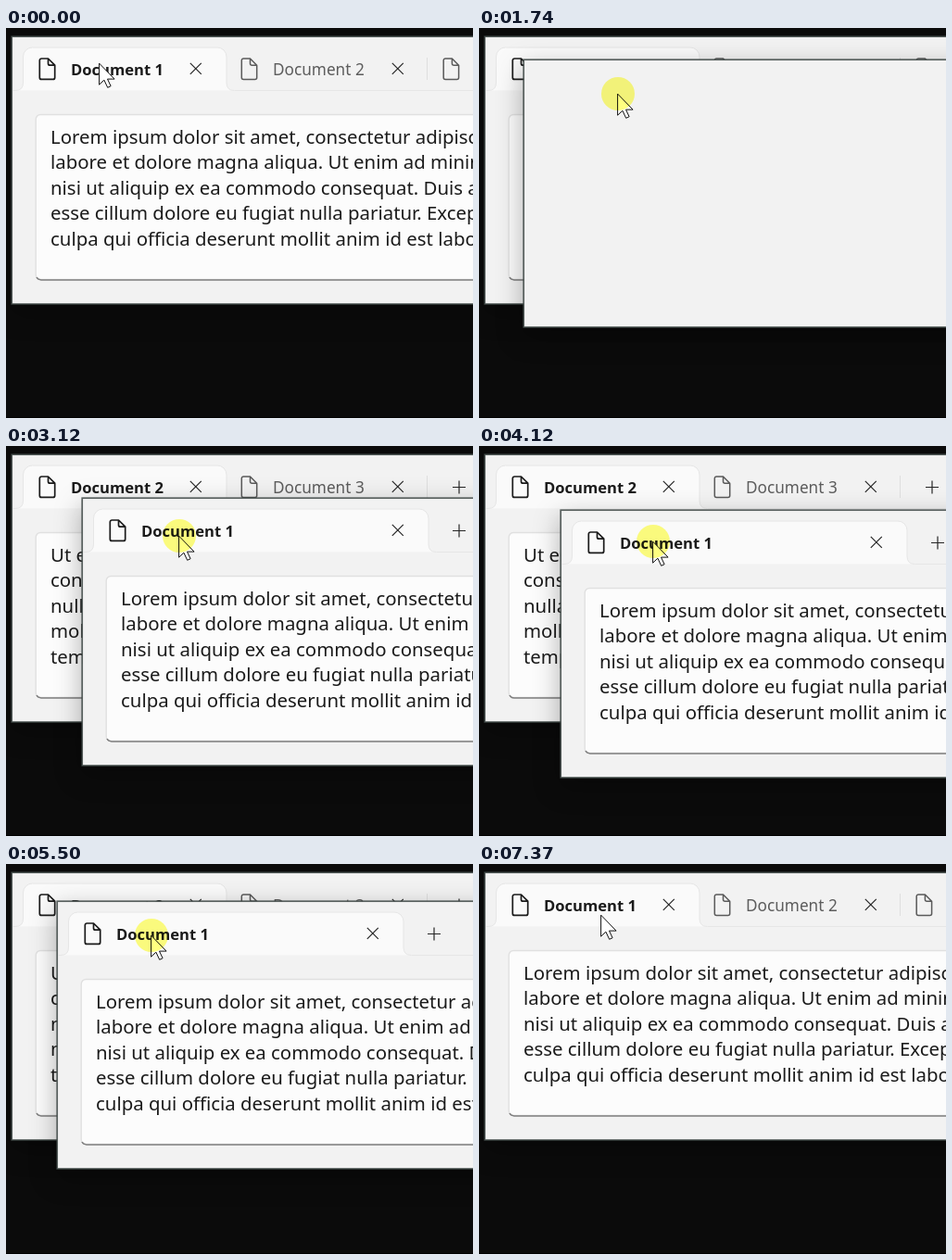
Recreate the animation shown at these times as an HTML page. Size 504 px wide and 421 px high, loop 7880 ms.

```html
<!DOCTYPE html>
<html lang="en">
<head>
<meta charset="utf-8">
<title>Tab tear-off</title>
<style>
  html, body { margin: 0; width: 100%; height: 100%; overflow: hidden; background: #0b0b0b; }
  svg { display: block; width: 504px; height: 421px; }
  text { font-family: "Noto Sans", "Open Sans", sans-serif; fill: #1b1b1b; white-space: pre; }
  .body { font-size: 20.4px; }
  .title { font-size: 17.2px; fill: #5d5d5d; }
  .title.on { font-size: 16.6px; font-weight: 600; fill: #1b1b1b; }
  .frame { fill: #f2f2f2; stroke: #3d4643; stroke-width: 1.7; stroke-opacity: .85; filter: drop-shadow(0 9px 14px rgba(0, 0, 0, .3)); }
  .tab { fill: #fafafa; stroke: #e6e6e6; }
  .box { fill: #fcfcfc; stroke: #e0e0e0; stroke-width: 1.4; }
  .rule { fill: none; stroke: #808080; stroke-width: 1.5; }
  .icon { fill: none; stroke: #5a5a5a; stroke-width: 1.5; stroke-linejoin: round; }
  .icon.on { stroke: #1b1b1b; stroke-width: 1.7; }
  .glyph { fill: none; stroke: #262626; stroke-width: 1.2; }
  .sep { stroke: #dedede; }
  #halo { fill: #ffff80; mix-blend-mode: multiply; }
</style>
</head>
<body>
<svg viewBox="0 0 504 421">
  <rect width="504" height="421" fill="#0b0b0b"/>
  <rect y="420" width="504" height="1"/>
  <g id="wins"><g id="torn"></g><g id="main"></g></g>
  <g id="pointer">
    <path d="M-.4 .1V23.2L4.9 18.2 8.7 26.3 12.1 24.7 8.5 17.1H16.1Z" fill="#fff" stroke="#111"/>
    <circle id="halo" r="18"/>
  </g>
</svg>
<script>
const LOOP = 7880, STEP = 248, HOLD = 140, LAST = 28;

// events, counted in steps
const PRESS = 1, SHOW = 6, SPLIT = 8, EMPTY = 22, BEHIND = 23, HIDE = 24, MERGE = 25;

// key points: step, x, y
const pointerPath = [[1, 101, 38], [7, 150, 71], [10, 182, 94], [12, 187, 97], [14, 193, 108],
  [16, 188, 103], [18, 173, 91], [23, 147, 67], [28, 132, 55]];
const windowPath = [[7, 48, 34], [10, 78, 54], [12, 82, 56], [15, 94, 75], [18, 77, 58], [22, 48, 34]];

const lorem = [
  "Lorem ipsum dolor sit amet, consectetur adipiscing",
  "labore et dolore magna aliqua. Ut enim ad minim veniam",
  "nisi ut aliquip ex ea commodo consequat. Duis aute irure",
  "esse cillum dolore eu fugiat nulla pariatur. Excepteur sint",
  "culpa qui officia deserunt mollit anim id est laborum."
];
const enim = [
  "Ut enim ad minim veniam, quis nostrud exercitation",
  "consequat. Duis aute irure dolor in reprehenderit in",
  "nulla pariatur. Excepteur sint occaecat cupidatat non",
  "mollit anim id est laborum. Lorem ipsum dolor sit amet",
  "tempor incididunt ut labore et dolore magna aliqua."
];

const $ = id => document.getElementById(id);
const frame = `<rect class="frame" x="6.2" y="9.2" width="640" height="288.8"/>`;
const sep = `<path class="sep" d="M454.5 32v24"/>`;

const docIcon = (x, on) =>
  `<path class="icon${on}" transform="translate(${x} 32.2)" d="M2.8 .8H10L17.2 8V21.2A2 2 0 0 1 15.2 23.2H2.8A2 2 0 0 1 .8 21.2V2.8A2 2 0 0 1 2.8 .8ZM10 .8V6A2 2 0 0 0 12 8H17.2"/>`;
const close = x => `<path class="glyph" d="M${x - 6} 37.8l12 12m0-12l-12 12"/>`;
const plus = x => `<path class="glyph" d="M${x - 7} 44.5h14m-7-7v14"/>`;

function tab(i, name, width) {
  const x = 18 + 218 * i, on = i ? "" : " on";
  return docIcon(x + 17.5, on) +
    `<text class="title${on}" x="${x + 52}" y="50.5">${name}</text>` + close(x + width - 33.2);
}

function content(names, lines, width, tail) {
  const r = 18 + width;
  return frame +
    `<path class="tab" d="M7 67.5H10Q18.5 67.5 18.5 59V31A10 10 0 0 1 28.5 21H${r - 10}A10 10 0 0 1 ${r} 31V59Q${r} 67.5 ${r + 8.5} 67.5H646"/>` +
    names.map((name, i) => tab(i, name, width)).join("") + tail +
    `<rect class="box" x="32.2" y="93.5" width="590" height="178" rx="5"/>` +
    `<path class="rule" d="M33 269Q34.5 271.9 38 271.9H618"/>` +
    lines.map((s, i) => `<text class="body" x="48" y="${Math.floor(125 + 27.6 * i)}">${s}</text>`).join("");
}

const before = content(["Document 1", "Document 2"], lorem, 220, sep + docIcon(471.4, ""));
const after = content(["Document 2", "Document 3"], enim, 220, sep + plus(489));
const single = content(["Document 1"], lorem, 362, plus(413));

// even steps, with a short hold before every seventh one
const stepTime = n => n * STEP + HOLD * Math.max(0, Math.floor((n - 4) / 7));

function stepAt(t) {
  let n = LAST;
  while (stepTime(n) > t) n--;
  return n;
}

function along(path, n) {
  const next = path.findIndex(p => p[0] > n);
  if (next < 1) return path.at(next).slice(1);
  const [n0, x0, y0] = path[next - 1], [n1, x1, y1] = path[next];
  const k = (n - n0) / (n1 - n0);
  return [x0 + (x1 - x0) * k, y0 + (y1 - y0) * k].map(Math.round);
}

const move = (id, x, y) => $(id).setAttribute("transform", `translate(${x} ${y})`);
const show = (id, on) => $(id).style.display = on ? "" : "none";

const shown = {};
function fill(id, html) {
  if (shown[id] !== html) $(id).innerHTML = shown[id] = html;
}

function draw(t) {
  const n = stepAt(t);
  const within = (a, b) => n >= a && n < b;
  const [wx, wy] = along(windowPath, n);

  fill("main", within(SPLIT, MERGE) ? after : before);
  fill("torn", within(SPLIT, EMPTY) ? single : frame);
  move("torn", wx - 6, wy - 9);
  show("torn", within(SHOW, HIDE));

  const top = $(n < BEHIND ? "torn" : "main");
  if ($("wins").lastElementChild !== top) $("wins").append(top);

  move("pointer", ...along(pointerPath, n));
  show("halo", within(PRESS, MERGE));
}

const start = performance.now();
function tick() {
  draw((performance.now() - start) % LOOP);
  requestAnimationFrame(tick);
}
tick();
</script>
</body>
</html>
```
